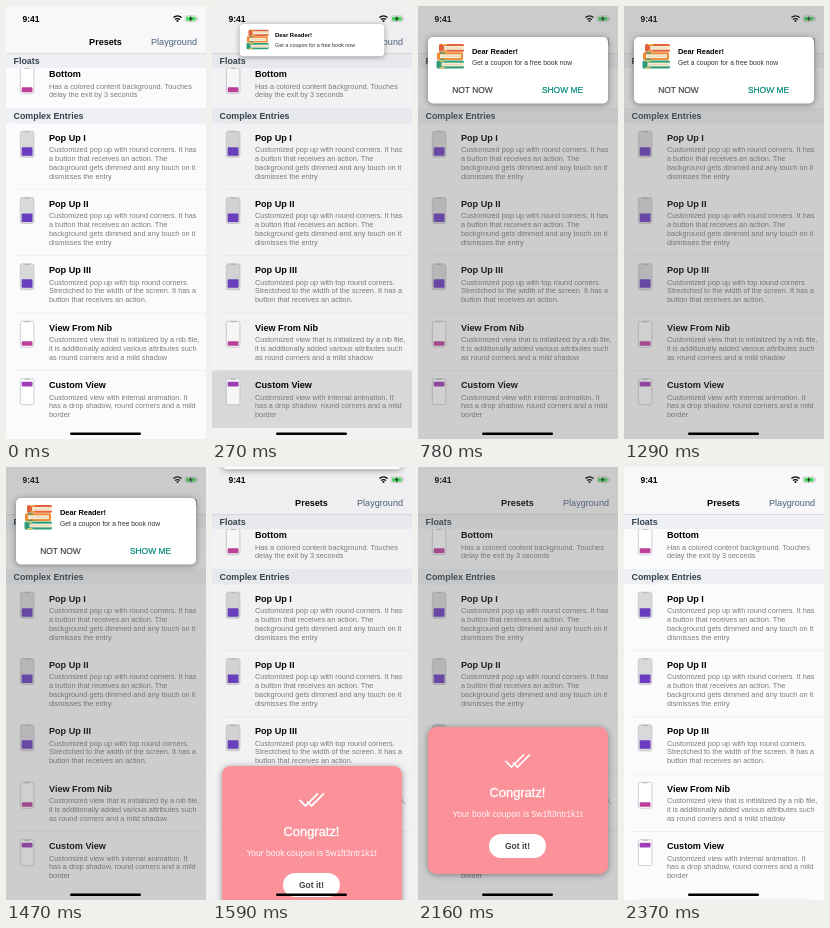
These frames come from a looping animation (200 by 433 pixels, 2.4 s). An HTML page:

```html
<!DOCTYPE html>
<html lang="en">
<head>
<meta charset="utf-8">
<style>
  html, body { margin: 0; width: 100%; height: 100%; overflow: hidden; background: #fff; }
  svg { display: block; width: 100vw; height: 100vh; font-family: "Liberation Sans", Arial, sans-serif; }
  .b { font-weight: 700; }
  .mid { text-anchor: middle; }
  .title { font: 700 9.1px "Liberation Sans", Arial, sans-serif; }
  .desc { font-size: 7.33px; fill: #7c7c7e; }
  .head { font: 700 8.9px "Liberation Sans", Arial, sans-serif; fill: #34434f; }
  .card { filter: drop-shadow(0 1px 3px rgba(0, 0, 0, .4)); }
</style>
</head>
<body>
<svg viewBox="0 0 200 433">
  <rect width="200" height="433" fill="#fbfafc"/>
  <rect id="selected" y="364.5" width="200" height="57.5" fill="#dfdee0"/>
  <g id="rows"></g>
  <rect y="102" width="200" height="15" fill="#eef0f3"/>
  <text class="head" x="7.5" y="112.8">Complex Entries</text>
  <rect y="47.5" width="200" height="14.5" fill="#eef0f3"/>
  <text class="head" x="7.5" y="58.3">Floats</text>
  <rect width="200" height="47.5" fill="#f8f7f9"/>
  <path d="M0 47.5H200" stroke="#c4c4c6" stroke-width=".5"/>
  <text class="title mid" x="99.5" y="38.8">Presets</text>
  <text x="145" y="38.8" font-size="9.1" fill="#486078">Playground</text>

  <text class="b" x="16.5" y="15.9" font-size="8.5">9:41</text>
  <g fill="none" stroke="#000" stroke-width="1.3">
    <path d="M167.4 11.6Q171.5 8.2 175.6 11.6M169 13.5Q171.5 11.6 174 13.5"/>
    <circle cx="171.5" cy="15" r=".4"/>
  </g>
  <rect x="179" y="9.8" width="11.6" height="5.9" rx="1.5" fill="#fff" stroke="#aaa" stroke-width=".5"/>
  <rect x="180" y="10.7" width="9.6" height="4.1" rx=".8" fill="#4cd964"/>
  <path d="M185.4 9.6L182.9 13.2H184.6L184 16L186.7 12.2H185Z" fill="#222"/>
  <path d="M191.4 11.8V13.6" stroke="#aaa" stroke-width=".8"/>

  <rect id="dim" width="200" height="433" fill="#646464"/>

  <g id="alert">
    <rect id="panel" class="card" x="10" y="31" width="180" height="40" rx="5" fill="#fff"/>
    <g id="books"></g>
    <text class="b" x="54" y="47.6" font-size="7.4">Dear Reader!</text>
    <text x="54" y="59" font-size="6.75" fill="#333">Get a coupon for a free book now</text>
    <g id="buttons" class="mid" font-size="8.45" stroke-width=".2">
      <text x="54.5" y="87.4" fill="#444" stroke="#444">NOT NOW</text>
      <text x="144.5" y="87.4" fill="#00897b" stroke="#00897b">SHOW ME</text>
    </g>
  </g>

  <g id="coupon" class="mid" fill="#fff">
    <rect class="card" x="10" y="260" width="180" height="147" rx="8.5" fill="#fb9299"/>
    <path d="M87.5 294L93.5 300L106 287.5M95 295.5L99.5 300L112 287.5" fill="none" stroke="#fff" stroke-width="1.7"/>
    <text x="99.5" y="329.7" font-size="12.9" stroke="#fff" stroke-width=".35">Congratz!</text>
    <text x="99.5" y="350" font-size="8.5" fill-opacity=".9">Your book coupon is 5w1ft3ntr1k1t</text>
    <rect x="71" y="367" width="57" height="24" rx="12"/>
    <text class="b" x="99.5" y="382.4" font-size="8.5" fill="#444">Got it!</text>
  </g>
  <rect x="64" y="426.4" width="71" height="2.5" rx="1.2" fill="#000"/>
</svg>
<script>
const LOOP = 2400;
const $ = id => document.getElementById(id);

// top, title, lines, screen colour, block [y, height, colour]
const popUp = ["Customized pop up with round corners. It has", "a button that receives an action. The",
  "background gets dimmed and any touch on it", "dismisses the entry"];
const PURPLE = "#6a3cc0", PINK = "#bd3f9c", GREY = "#d9d9dc";
const rows = [
  [53.5, "Bottom", ["Has a colored content background. Touches", "delay the exit by 3 seconds"], "#fff", [19.5, 5, PINK]],
  [117, "Pop Up I", popUp, GREY, [16, 8.5, PURPLE]],
  [183.3, "Pop Up II", popUp, GREY, [16, 8.5, PURPLE]],
  [249.6, "Pop Up III", ["Customized pop up with top round corners.", "Strectched to the width of the screen. It has a",
    "button that receives an action."], GREY, [15.5, 8.5, PURPLE]],
  [307, "View From Nib", ["Customized view that is initialized by a nib file,", "it is additionally added various attributes such",
    "as round corners and a mild shadow"], "#fff", [20, 4.5, PINK]],
  [364.5, "Custom View", ["Customized view with internal animation. It", "has a drop shadow, round corners and a mild",
    "border"], "#fff", [3, 4.8, "#a03cb8"]],
];
$("rows").innerHTML = rows.map(([top, title, lines, screen, [y, h, color]]) => `
  <g transform="translate(0 ${top})">
    <path d="M8 0H200" stroke="#e4e4e6" stroke-width=".5"/>
    <rect x="14.3" y="8.2" width="13.6" height="26" rx="2" fill="${screen}" stroke="#c4c4c8" stroke-width=".8"/>
    <path d="M18.5 8.8H23.7" stroke="#b4b4b8"/>
    <rect x="15.7" y="${8.2 + y}" width="10.8" height="${h}" rx=".8" fill="${color}"/>
    <text class="title" x="43" y="17.6">${title}</text>
    ${lines.map((s, i) => `<text class="desc" x="43" y="${29 + 8.9 * i}">${s}</text>`).join("")}
  </g>`).join("");

// x, y, width, cover colour
$("books").innerHTML = [[21, 38, 25, "#e2603c"], [19, 46.3, 26, "#ef8a35"], [18.5, 54.6, 27.5, "#2f9c78"]]
  .map(([x, y, w, color], i) => `
    <rect x="${x}" y="${y}" width="${w}" height="7.8" rx="1.5" fill="${color}"/>
    <rect x="${x + (i === 1 ? 3 : 5)}" y="${y + 2}" width="${w - 5}" height="3.8" fill="#f6ecd4"/>
    <path d="M${x + 5} ${y + 4}h${w - 7}" stroke="#d8c9a4" stroke-width=".6"/>
    <path d="M${x + 3} ${y + .6}h5M${x + 3} ${y + 7}h5" stroke="${i === 1 ? "#2f9c78" : "#f4c54c"}" stroke-width="1.1"/>`).join("");

// Moments in ms
const SHOW = 190, EXPAND = 330, SWAP = 1510, DISMISS = 2275;

const ramp = (t, start, length) => Math.min(1, Math.max(0, (t - start) / length));
const ease = p => p * p * (3 - 2 * p);
const settle = (t, start) => {
  const x = Math.max(0, t - start) * .035;
  return 1 - (1 + x) * Math.exp(-x);
};
const bounce = (t, start) => {
  const x = Math.max(0, t - start);
  return 1 - Math.exp(-x / 50) * Math.cos(x / 38);
};
const dimIn = (t, start) => ease(ramp(t, start, 300));

function draw(t) {
  $("selected").style.opacity = t < 120 ? 0 : 1 - ramp(t, 360, 120);

  const alertOut = ramp(t, SWAP, 87) ** 2;
  const scale = .6 + .4 * ease(ramp(t, SHOW, 160));
  const rise = 75 * (1 - settle(t, SHOW)) + 110 * alertOut;
  $("alert").style.display = t > SHOW && alertOut < 1 ? "" : "none";
  $("alert").setAttribute("transform", `translate(100 ${51 - rise}) scale(${scale}) translate(-100 -51)`);
  $("alert").style.opacity = .8 + .2 * ramp(t, SHOW, 80);
  $("panel").setAttribute("height", 40 + 26.5 * bounce(t, EXPAND));
  $("buttons").style.opacity = ramp(t, EXPAND + 20, 130);

  const couponOut = ramp(t, DISMISS, 97) ** 2;
  const drop = 173 * (1 - settle(t, SWAP)) + 180 * couponOut;
  $("coupon").style.display = t > SWAP && couponOut < 1 ? "" : "none";
  $("coupon").setAttribute("transform", `translate(0 ${drop})`);

  const dim = dimIn(t, SHOW) - ease(ramp(t, SWAP, 80)) + dimIn(t, SWAP) - ease(ramp(t, DISMISS, 100));
  $("dim").style.opacity = .3 * dim;
}

const origin = performance.now();
function tick() {
  draw((performance.now() - origin) % LOOP);
  requestAnimationFrame(tick);
}
tick();
</script>
</body>
</html>
```
